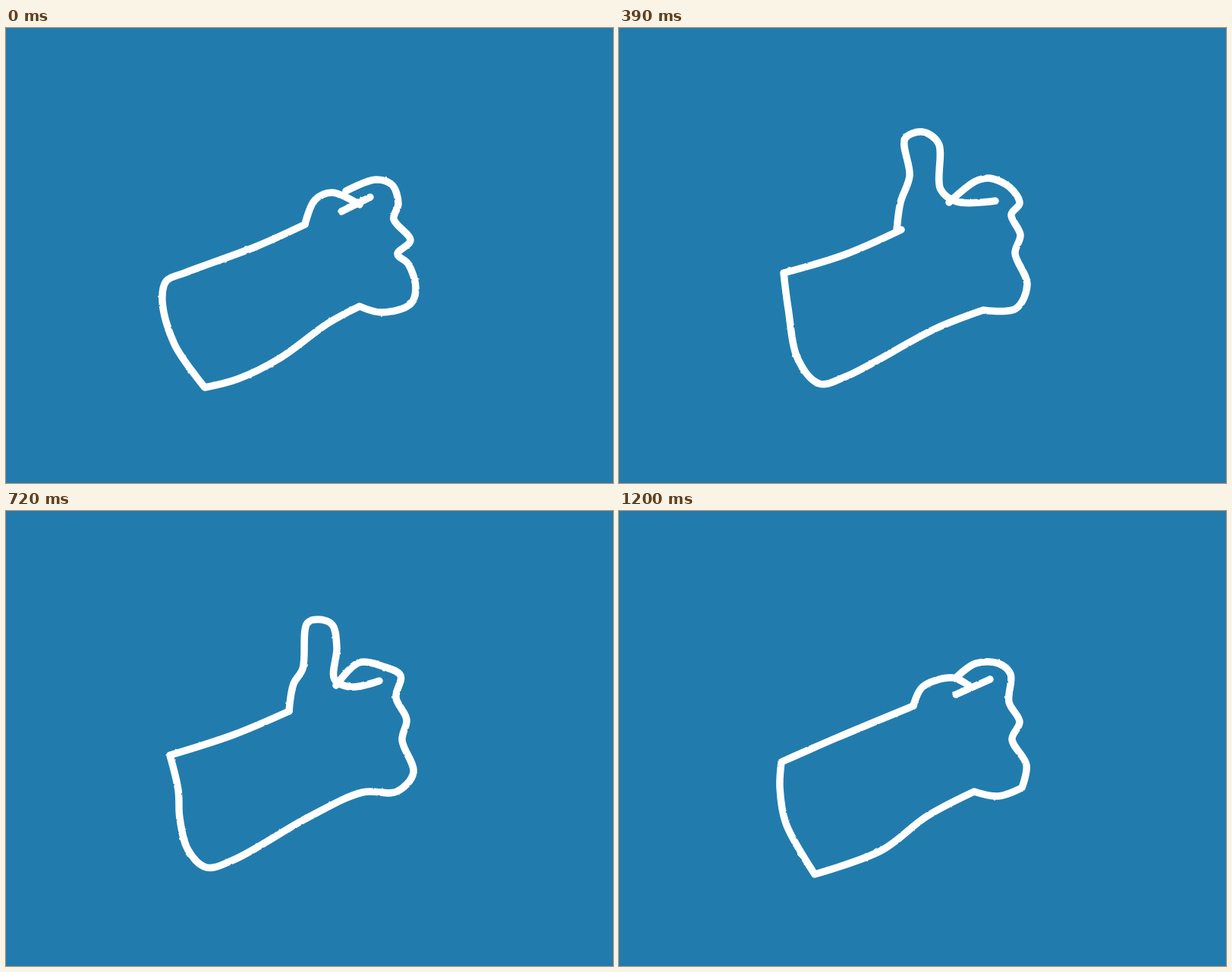
These frames come from a looping animation (800 by 600 pixels, 1.23 s). An HTML page:

```html
<!DOCTYPE html>
<html lang="en">
<head>
<meta charset="utf-8">
<title>Thumbs up</title>
<style>
  html, body { margin: 0; width: 100%; height: 100%; overflow: hidden; background: #217cad; }
  svg { display: block; width: 800px; height: 600px; }
  path { fill: none; stroke: #fff; stroke-width: 9.5; stroke-linecap: round; stroke-linejoin: round; }
</style>
</head>
<body>
<svg viewBox="0 0 800 600">
  <filter id="chalk" filterUnits="userSpaceOnUse" x="0" y="0" width="800" height="600" color-interpolation-filters="sRGB">
    <feTurbulence type="fractalNoise" baseFrequency=".14" numOctaves="2" seed="4"/>
    <feDisplacementMap in="SourceGraphic" scale="2" xChannelSelector="R" yChannelSelector="G"/>
  </filter>
  <g id="stage" filter="url(#chalk)"></g>
</svg>
<script>
const LOOP = 1230, STEP = 30;

// Key points of each stroke; "!" marks a sharp corner.
const poses = {
  fist: [
    '394,259! 330,288 238,322 211,334 206,360 222,417 262,474! 305,463 360,436 425,389 466,367! 495,375 533,364 540,343 530,311 516,298 533,280 511,252 517,232 509,207 487,200 448,215',
    '394,259 407,227 430,217 466,233',
    '442,242 480,223'
  ],
  squeeze: [
    '388,257! 287,299 214,331! 212,365 220,412 258,479! 347,447 405,403 468,370! 500,376 531,365! 537,335 518,301 528,278 514,252 516,215 500,201 470,201 444,220',
    '388,257 400,232 440,220 462,231',
    '444,242 489,222'
  ],
  raise: [
    '372,266! 297,299 217,323! 223,370 236,437 264,469 298,460 418,396 480,372! 523,370 538,338 522,297 529,273 517,246 528,231 515,210 488,198 470,202 435,230',
    '366,267 371,230 383,195 377,146 400,137 421,152 424,213 445,229 496,228'
  ],
  up: [
    '490,215 440,222 420,195 416,158 385,139 375,147 376,195 363,222 359,262 343,281 275,301 229,317! 234,375 235,423 255,464 318,447 385,411 480,369 515,366 547,345 525,305 531,269 512,245 521,220 516,204 489,203 457,215',
    '407,69 402,92',
    '461,91 443,107',
    '479,141 470,146'
  ],
  lower: [
    '373,264! 300,295 216,322! 227,368 229,405 240,447 264,470 300,460 400,403 470,371 515,370 537,345 522,302 528,275 514,246 520,217 497,205 465,200 435,230',
    '373,264 379,228 391,208 397,148 412,143 430,150 436,180 433,222 455,232 492,224'
  ]
};

// Start time, pose, then the drift along the arm at the start and end of the hold.
const holds = [
  [0, 'fist', 0, 1],
  [120, 'squeeze', 0, 0],
  [270, 'raise', 0, 0],
  [450, 'up', 0, 0],
  [600, 'up', 0, 4],
  [690, 'lower', 0, 0],
  [870, 'fist', 2.5, 2.5],
  [960, 'fist', 2.5, -5],
  [1110, 'squeeze', 0, 0]
];

// Bezier handle at b towards c, with a before b (centripetal Catmull-Rom).
function handle(a, b, c) {
  const m = Math.hypot(b.x - a.x, b.y - a.y), n = Math.hypot(c.x - b.x, c.y - b.y);
  if (!m || b.corner) return `${b.x} ${b.y}`;
  const r = Math.sqrt(m * n), w = 3 * (m + r);
  const mix = k => (m * c[k] - n * a[k] + (2 * m + 3 * r + n) * b[k]) / w;
  return `${mix('x')} ${mix('y')}`;
}

function curve(text) {
  const p = text.split(' ').map(s => {
    const [x, y] = s.split(',').map(parseFloat);
    return { x, y, corner: s.endsWith('!') };
  });
  let d = `M${p[0].x} ${p[0].y}`;
  for (let i = 1; i < p.length; i++) {
    const b = p[i - 1], c = p[i];
    d += `C${handle(p[i - 2] || b, b, c)} ${handle(p[i + 1] || c, c, b)} ${c.x} ${c.y}`;
  }
  return d;
}

const stage = document.getElementById('stage');
const groups = {};
for (const name in poses) {
  const g = groups[name] = document.createElementNS(stage.namespaceURI, 'g');
  for (const line of poses[name]) {
    const path = document.createElementNS(stage.namespaceURI, 'path');
    path.setAttribute('d', curve(line));
    g.append(path);
  }
  stage.append(g);
}

let last = -1;
function show(ms) {
  const t = Math.floor((ms % LOOP) / STEP) * STEP;
  if (t === last) return;
  last = t;
  const i = holds.findLastIndex(h => h[0] <= t);
  const [start, pose, from, to] = holds[i];
  const end = i + 1 < holds.length ? holds[i + 1][0] : LOOP;
  const drift = from + (to - from) * (t - start) / (end - STEP - start);
  for (const name in groups) groups[name].style.display = name === pose ? '' : 'none';
  groups[pose].setAttribute('transform', `translate(${drift} ${-0.4 * drift})`);
}

const begin = performance.now();
function tick() {
  show(performance.now() - begin);
  requestAnimationFrame(tick);
}
tick();
</script>
</body>
</html>
```
